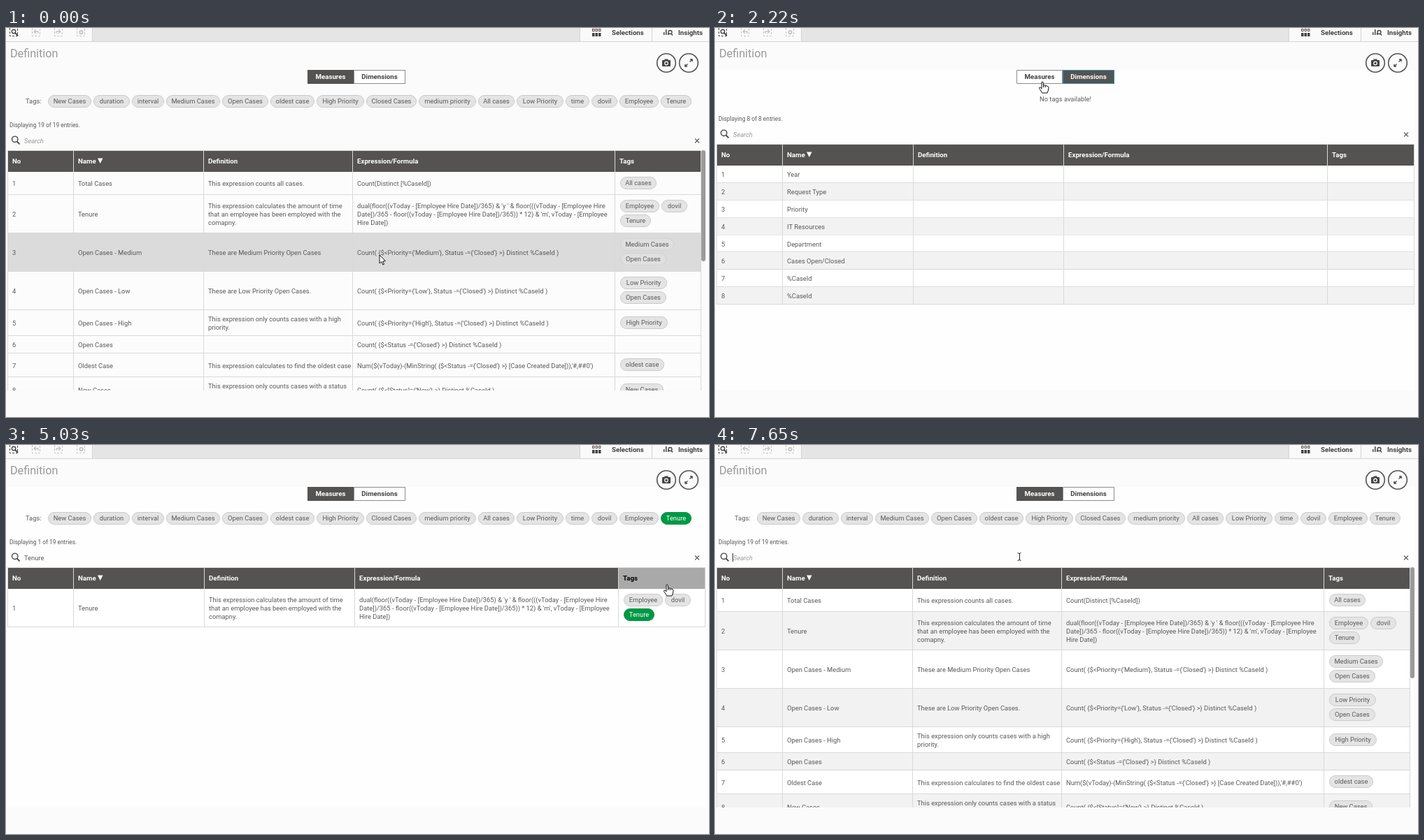
Write an HTML page with a canvas that moves like this. It is 1005x557 px and loops after 8 s.

```html
<!DOCTYPE html>
<html lang="en">
<head>
<meta charset="utf-8">
<title>Definition</title>
<style>
html, body { margin: 0; width: 100%; height: 100%; overflow: hidden; background: #fbfbfb; }
canvas { display: block; }
</style>
</head>
<body>
<canvas id="stage" width="1005" height="557"></canvas>
<script>
const c = document.getElementById('stage').getContext('2d');
const LOOP = 8000, INK = '#595959', DARK = '#545352', GREEN = '#009845', EDGE = '#d9d9d9';
const FAMILY = 'Roboto, "Open Sans", sans-serif';
const BODY = '9.35px ' + FAMILY, BOLD = 'bold 9.7px ' + FAMILY, SMALL = '8.4px ' + FAMILY;

const tags = ['New Cases', 'duration', 'interval', 'Medium Cases', 'Open Cases', 'oldest case',
  'High Priority', 'Closed Cases', 'medium priority', 'All cases', 'Low Priority', 'time',
  'dovil', 'Employee', 'Tenure'];
const tagX = [60, 125, 180, 229, 309, 378, 444, 515, 590, 675, 730, 800, 837, 877, 936, 983];
const tagWidth = name => { const i = tags.indexOf(name); return tagX[i + 1] - 3 - tagX[i]; };

// Row: height, name, definition, formula, lines of tags
const open = p => "Count( {$<Priority={'" + p + "'}, Status -={'Closed'} >} Distinct %CaseId )";
const tenure = [55, 'Tenure',
  'This expression calculates the amount of time\nthat an employee has been employed with the\ncomapny.',
  "dual(floor((vToday - [Employee Hire Date])/365) & 'y ' & floor(((vToday - [Employee Hire\n" +
  "Date])/365 - floor((vToday - [Employee Hire Date])/365)) * 12) & 'm', vToday - [Employee\nHire Date])",
  [['Employee', 'dovil'], ['Tenure']]];
const measureRows = [
  [33, 'Total Cases', 'This expression counts all cases.', 'Count(Distinct [%CaseId])', [['All cases']]],
  tenure,
  [55, 'Open Cases - Medium', 'These are Medium Priority Open Cases', open('Medium'), [['Medium Cases'], ['Open Cases']]],
  [55, 'Open Cases - Low', 'These are Low Priority Open Cases.', open('Low'), [['Low Priority'], ['Open Cases']]],
  [37, 'Open Cases - High', 'This expression only counts cases with a high\npriority.', open('High'), [['High Priority']]],
  [25, 'Open Cases', '', "Count( {$<Status -={'Closed'} >} Distinct %CaseId )", []],
  [34, 'Oldest Case', 'This expression calculates to find the oldest case',
    "Num($(vToday)-(MinString( {$<Status -={'Closed'} >} [Case Created Date])),'#,##0')", [['oldest case']]],
  [37, 'New Cases', 'This expression only counts cases with a status\nof new.',
    "Count( {$<[Status]={'New'} >} Distinct %CaseId )", [['New Cases']]]
];
const dimensionRows = ['Year', 'Request Type', 'Priority', 'IT Resources', 'Department',
  'Cases Open/Closed', '%CaseId', '%CaseId'].map(n => [24.9, n, '', '', []]);
const taggedRows = [tenure,
  [37, 'Most Cases', '', "firstsortedvalue( Priority, -Aggr(Count({<[Cases Open/Closed]={'Open Cases'}>}Distinct\n" +
    '[%CaseId] ),[Case Owner Group],Priority))', [['dovil']]],
  [33.5, 'Cumulative New Cases', '', 'Sum([Number of New Cases])', [['dovil']]]];

const narrow = [3, 97, 283, 496, 871, 994], wide = [3, 97, 284, 499, 876, 1000];
const views = {
  measures: { rows: measureRows, cols: narrow, count: '19 of 19', find: '', scroll: true },
  dimensions: { rows: dimensionRows, cols: wide, count: '8 of 8', find: '' },
  tenure: { rows: [tenure], cols: wide, count: '1 of 19', find: 'Tenure' },
  person: { rows: taggedRows, cols: wide, count: '3 of 19', find: 'dovil', mark: 'Tenure' }
};
const schedule = [[0, 'measures'], [1250, 'dimensions'], [3040, 'measures'], [4430, 'tenure'],
  [5400, 'person'], [6830, 'measures']];

// Pointer moves: first step, last step, number of steps, x, y reached
const moves = [[140, 770, 7, 547, 63], [1130, 1470, 4, 498, 95], [2220, 2220, 1, 468, 77],
  [2340, 2920, 6, 454, 74], [3040, 3160, 2, 454, 82], [3280, 3740, 5, 640, 122],
  [3870, 4330, 5, 956, 100], [4910, 4910, 1, 952, 150], [5030, 5030, 1, 945, 200],
  [5150, 5400, 3, 960, 219], [6130, 6130, 1, 979, 185], [6240, 6460, 3, 986, 159],
  [6710, 7400, 7, 700, 160], [7520, 7650, 2, 435, 160]];

function pointerAt(t) {
  let x = 534, y = 325;
  for (const [from, to, n, tx, ty] of moves) {
    if (t < from) break;
    const gap = n > 1 ? (to - from) / (n - 1) : 1;
    const p = Math.min(n, Math.floor((t - from) / gap + 1e-6) + 1) / n;
    const e = p * p * (3 - 2 * p);
    x += (tx - x) * e;
    y += (ty - y) * e;
  }
  return [Math.round(x), Math.round(y)];
}

function rect(x, y, w, h, color) { c.fillStyle = color; c.fillRect(x, y, w, h); }
function text(s, x, y, color = INK, font = BODY, align = 'left') {
  c.font = font; c.fillStyle = color; c.textAlign = align;
  c.fillText(s, x, y);
}
function line(points, color, width = 1) {
  c.strokeStyle = color; c.lineWidth = width;
  c.beginPath();
  for (let i = 0; i < points.length; i += 2) c.lineTo(points[i], points[i + 1]);
  c.stroke();
}
function ring(x, y, r, color, width) {
  c.strokeStyle = color; c.lineWidth = width;
  c.beginPath(); c.arc(x, y, r, 0, 7); c.stroke();
}
function pill(name, x, y, active, dim) {
  c.beginPath();
  c.roundRect(x + .5, y + .5, tagWidth(name) - 1, 17, 8.5);
  c.fillStyle = active ? GREEN : dim ? '#dfdfdf' : '#e4e4e4';
  c.fill();
  c.strokeStyle = active ? GREEN : dim ? '#d3d3d3' : '#cbcbcb';
  c.lineWidth = 1; c.stroke();
  text(name, x + tagWidth(name) / 2, y + 12.3, active ? '#fff' : INK, BODY, 'center');
}

function topBar() {
  rect(0, 0, 1005, 19, '#fafafa');
  rect(124, 0, 696, 19, '#e5e5e5');
  rect(0, 19, 1005, 1, '#d4d4d4');
  for (const x of [123, 820, 923]) rect(x, 0, 1, 19, '#d4d4d4');
  for (let i = 0; i < 4; i++) {
    const x = 5.5 + 32 * i, color = i ? '#c4c4c4' : '#444';
    c.setLineDash([3, 2]);
    line([x, 0, x, 11.5, x + 11, 11.5, x + 11, 0], color);
    c.setLineDash([]);
    if (i == 0) { ring(11, 5, 2.7, color, 1.4); line([13, 7, 17, 11], color, 1.8); }
    if (i == 1 || i == 2) {
      const d = i == 1 ? 1 : -1, m = x + 5.5;
      line([m, 2, m - 3 * d, 5, m, 8], color, 1.3);
      line([m - 3 * d, 5, m + 3 * d, 5, m + 3 * d, 8], color, 1.3);
    }
    if (i == 3) ring(x + 6, 6, 2.2, color, 1.8);
  }
  for (let i = 0; i < 3; i++) {
    c.strokeStyle = '#5c4a4a'; c.lineWidth = 1;
    c.strokeRect(838.5 + 4.5 * i, 1.5, 2.5, 3);
    rect(838 + 4.5 * i, 7, 3.5, 5, '#444');
  }
  text('Selections', 866, 10, '#404040', BOLD);
  [[940, 6], [943, 2], [946, 7]].forEach(([x, y]) => rect(x, y, 1.5, 10 - y, '#444'));
  ring(949.5, 6, 2.5, '#444', 1.3);
  line([951, 8, 953, 10.5], '#444', 1.4);
  text('Insights', 961, 10, '#404040', BOLD);
}

function roundButtons() {
  for (const x of [944, 976]) ring(x, 50, 13.3, '#545454', 1.6);
  c.fillStyle = '#444';
  c.beginPath(); c.roundRect(938, 46, 12, 9, 1); c.fill();
  rect(941.5, 44.5, 5, 2, '#444');
  ring(944, 50.5, 2.3, '#fff', 1.2);
  for (const d of [1, -1]) {
    const at = (a, b) => [976 + a * d, 50 - b * d];
    line([...at(1.5, 1.5), ...at(5, 5)], '#444', 1.3);
    line([...at(2, 5), ...at(5, 5), ...at(5, 2)], '#444', 1.5);
  }
}

function toggle(t, dims) {
  [['Measures', 431, 66, !dims], ['Dimensions', 497, 74, dims]].forEach(([name, x, w, on]) => {
    const focus = on && t >= 1010 && t < 4430;
    rect(x, 60, w, 20, on ? DARK : '#fff');
    if (on || t < 1010 || t >= 1130) {
      c.strokeStyle = focus ? '#2f8fb8' : on ? DARK : '#8c8c8c'; c.lineWidth = 1;
      c.strokeRect(x + .5, 60.5, w - 1, 19);
    }
    text(name, x + w / 2, 73.3, on ? '#fff' : '#404040', BOLD, 'center');
  });
}

function table(t, view, top, px, py) {
  const { rows, cols, find, mark } = view, right = cols[5];
  const hoverHead = py >= top && py < top + 31;
  rect(2, top, right - 2, 31, EDGE);
  rect(3, top + 1, right - 4, 30, DARK);
  ['No', 'Name', 'Definition', 'Expression/Formula', 'Tags'].forEach((name, i) => {
    const hot = hoverHead && px >= cols[i] && px < cols[i + 1];
    if (hot) rect(cols[i], top + 1, cols[i + 1] - cols[i] - 1, 30, '#aaa9aa');
    if (i) rect(cols[i] - 1, top, 1, 31, EDGE);
    text(name, cols[i] + 6, top + 18.8, hot ? '#000' : '#fff', BOLD);
  });
  c.fillStyle = '#fff';
  c.beginPath();
  c.moveTo(131, top + 11.5); c.lineTo(138.5, top + 11.5); c.lineTo(134.75, top + 19);
  c.fill();

  let y = top + 31;
  rows.forEach(([h, name, def, formula, groups], i) => {
    const hot = py >= y && py < y + h && px < right, mid = y + h / 2;
    const striped = i % 2 && (t >= 1130 || i == 1 && t >= 350);
    rect(3, y, right - 3, h, hot ? '#dbdbdb' : striped ? '#f2f2f2' : t < 1130 ? '#fcfcfc' : '#fff');
    rect(2, Math.round(y + h) - 1, right - 2, 1, EDGE);
    for (const x of cols) rect(x - 1, y, 1, h, EDGE);
    if (name == mark) rect(103, mid - 7, 28, 13.5, '#ff0');
    [String(i + 1), name, def, formula].forEach((s, k) => {
      const lines = s.split('\n');
      lines.forEach((l, j) => text(l, cols[k] + 6, mid + 3.5 + (j - (lines.length - 1) / 2) * 12.4));
    });
    groups.forEach((group, j) => {
      let x = cols[4] + 7;
      for (const tag of group) {
        pill(tag, x, Math.floor(mid - (groups.length * 21 - 4) / 2 - 1) + j * 21, tag == find, hot);
        x += tagWidth(tag) + 3;
      }
    });
    y += h;
  });
  if (view.scroll) {
    c.fillStyle = '#9b9b9b';
    c.beginPath(); c.roundRect(994, 175, 6, 159, 3); c.fill();
  }
}

function shape(points, x, y) {
  c.beginPath();
  for (let i = 0; i < points.length; i += 2) c.lineTo(x + points[i], y + points[i + 1]);
  c.closePath();
  c.fillStyle = '#fff'; c.fill();
  c.strokeStyle = '#111'; c.lineWidth = 1; c.lineJoin = 'round'; c.stroke();
}
function pointer(x, y, top, rowTags) {
  const inside = (x0, y0, x1, y1) => x >= x0 && x < x1 && y >= y0 && y < y1;
  if (inside(20, top - 22, 975, top)) {
    line([x - 2.5, y - 5.5, x, y - 4.5, x + 2.5, y - 5.5], '#222');
    line([x + .5, y - 5, x + .5, y + 5], '#222');
    line([x - 2.5, y + 5.5, x, y + 4.5, x + 2.5, y + 5.5], '#222');
  } else if (inside(431, 60, 571, 85) || inside(60, 96, 980, 114) || inside(975, top - 22, 1000, top) ||
      inside(3, top, 1000, top + 31) || inside(rowTags, top + 31, 1000, 260)) {
    shape([-1, .5, 0, 0, 1.2, .8, 1.5, 5, 4, 5, 6, 6, 8, 6.5, 9, 8, 8.5, 12, 7, 16, -.5, 16,
      -2, 13, -4.5, 9.5, -4, 8, -2.8, 8, -1, 10], x, y);
    line([x + 1.6, y + 5, x + 1.6, y + 8], '#111');
    line([x + 4.2, y + 6, x + 4.2, y + 8], '#111');
  } else {
    shape([0, 0, 0, 12, 2.8, 9.6, 4.8, 14, 6.6, 13.2, 4.8, 9, 8.4, 8.6], x, y);
  }
}

function draw(t) {
  const mode = schedule.filter(s => t >= s[0]).pop()[1], view = views[mode];
  const dims = mode == 'dimensions', top = dims ? 166 : 175;
  const [px, py] = pointerAt(t);
  rect(0, 0, 1005, 557, '#fbfbfb');
  if (t >= 1130) rect(2, 60, 998, 459, '#fefefe');
  topBar();
  text('Definition', 6, 42.3, '#999', '16.2px ' + FAMILY);
  roundButtons();
  toggle(t, dims || t >= 1010 && t < 1250);

  if (dims) text('No tags available!', 501, 104.5, INK, BODY, 'center');
  else {
    text('Tags:', 28, 107.8);
    tags.forEach((name, i) => pill(name, tagX[i], 96, name == view.find));
  }
  text('Displaying ' + view.count + ' entries.', 5, top - 33, INK, SMALL);
  ring(12.7, top - 15.7, 4.2, '#454545', 1.4);
  line([15.7, top - 12.5, 19.5, top - 8.7], '#454545', 1.8);
  if (view.find) text(view.find, 26, top - 10.5);
  else text('Search', 26, top - 10.5, '#999', 'italic ' + BODY);
  if (t >= 7520) rect(25, 155, 1, 12, '#333');
  line([985, top - 16.5, 991, top - 10.5], INK, 1.1);
  line([991, top - 16.5, 985, top - 10.5], INK, 1.1);

  c.save();
  c.beginPath(); c.rect(0, 0, 1005, 519); c.clip();
  table(t, view, top, px, py);
  c.restore();
  pointer(px, py, top, view.cols[4]);
}

function tick(now) {
  draw(now % LOOP);
  requestAnimationFrame(tick);
}
requestAnimationFrame(tick);
</script>
</body>
</html>
```
